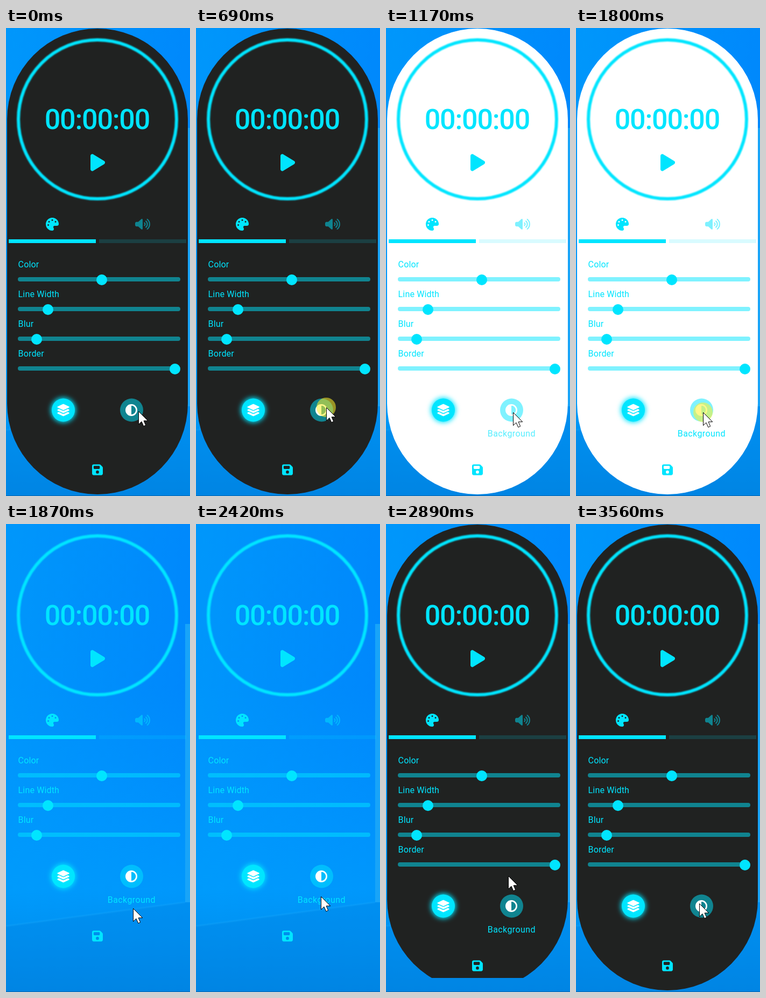
An HTML page for the animation above (3620 ms loop, 342 by 866 pixels).

```html
<!DOCTYPE html>
<html lang="en">
<head>
<meta charset="utf-8">
<title>Timer themes</title>
<style>
  html, body { margin: 0; width: 100%; height: 100%; overflow: hidden; background: #0091f6; }
  svg { display: block; width: 100vw; height: 100vh; color: #00e5ff; font: 16px Roboto, sans-serif; }
  #ui { fill: currentColor; }
  .half { opacity: .5; }
  .faint { opacity: .15; }
  .icon { fill: #fff; }
  .label { letter-spacing: .15px; }
  #tip { letter-spacing: .4px; text-anchor: middle; }
  #time { font-size: 52px; font-weight: 500; letter-spacing: -1.2px; text-anchor: middle; }
</style>
</head>
<body>
<svg viewBox="0 0 342 866">
  <defs>
    <linearGradient id="sky" x1="0" y1="0" x2="1" y2=".25">
      <stop offset="0" stop-color="#0097fb"/><stop offset="1" stop-color="#0088fc"/>
    </linearGradient>
    <linearGradient id="shade" x1="0" y1="0" x2="0" y2="1">
      <stop offset=".35" stop-color="#009cff" stop-opacity="0"/>
      <stop offset=".78" stop-color="#009dfc" stop-opacity=".75"/>
      <stop offset="1" stop-color="#0084e2"/>
    </linearGradient>
    <filter id="soft" x="-10%" y="-10%" width="120%" height="120%"><feGaussianBlur stdDeviation=".8"/></filter>
    <filter id="glow" x="-60%" y="-60%" width="220%" height="220%"><feGaussianBlur stdDeviation="5"/></filter>
    <path id="sheet" d="M477 210l53 24c18 9 18 35 0 44l-218 101c-15 7-33 7-48 0L46 278c-18-9-18-35 0-44l53-24 152 70c24 11 50 11 74 0z"/>
  </defs>

  <!-- desktop -->
  <rect width="342" height="866" fill="url(#sky)"/>
  <rect width="342" height="866" fill="url(#shade)"/>
  <path d="M0 744L342 699V866H0z" fill="#0084e4" opacity=".4"/>
  <path d="M0 744L333 700" stroke="#28b4ff" stroke-width="2" opacity=".35" filter="url(#soft)"/>
  <rect x="333" y="185" width="9" height="515" fill="#18a4f8"/>
  <rect y="865" width="342" height="1" fill="#0a66ae"/>

  <rect id="shell" x="2" y="1" width="336" height="862" rx="168"/>

  <g id="ui">
    <circle cx="170" cy="169" r="147" fill="none" stroke="currentColor" stroke-width="6" filter="url(#soft)"/>
    <text id="time" x="169.4" y="187">00:00:00</text>
    <path transform="translate(157 231) scale(.0703)" d="M73 39C40 19 0 42 0 80V432c0 38 40 61 73 41L361 297c31-19 31-63 0-82z"/>

    <path transform="translate(74 351) scale(.0469)" fill-rule="evenodd" d="M512 256c0 40-33 64-70 64H344c-27 0-48 21-48 48 0 26 24 50 24 82 0 32-22 62-64 62A256 256 0 1 1 512 256z
      M128 288a32 32 0 1 0-64 0 32 32 0 1 0 64 0z M128 192a32 32 0 1 0 0-64 32 32 0 1 0 0 64z
      M288 96a32 32 0 1 0-64 0 32 32 0 1 0 64 0z M384 192a32 32 0 1 0 0-64 32 32 0 1 0 0 64z"/>
    <g class="half" transform="translate(240 351.8) scale(.0437)">
      <path d="M301 35c12 5 19 16 19 29V448c0 28-33 42-53 24L132 352H64c-35 0-64-29-64-64V224c0-35 29-64 64-64h68L267 40c9-8 23-10 34-5z"/>
      <path d="M397 200a71 71 0 0 1 0 112M458 126a168 168 0 0 1 0 260M518 51a265 265 0 0 1 0 410"
        fill="none" stroke="currentColor" stroke-width="48" stroke-linecap="round"/>
    </g>
    <rect x="5" y="391" width="162" height="7"/>
    <rect class="faint" x="173" y="391" width="162" height="7"/>

    <g id="sliders"></g>

    <g id="lower">
      <circle cx="106.5" cy="707" r="23" filter="url(#glow)"/>
      <circle cx="106.5" cy="707" r="21.5"/>
      <g class="icon" transform="translate(94 695.8) scale(.0437)">
        <path d="M264 5c15-7 33-7 48 0l218 101c18 9 18 35 0 44l-218 101c-15 7-33 7-48 0L46 150c-18-9-18-35 0-44z"/>
        <use href="#sheet"/><use href="#sheet" y="128"/>
      </g>
      <circle class="half" cx="233.5" cy="707" r="21.5"/>
      <path class="icon" fill-rule="evenodd" d="M222 707a11 11 0 1 1 22 0 11 11 0 1 1-22 0zM233 698.7v16.6a8.3 8.3 0 0 0 0-16.6z"/>
      <text id="tip" x="233.4" y="756">Background</text>
      <path transform="translate(160 806) scale(.0446)" fill-rule="evenodd" d="M64 32C29 32 0 61 0 96V416c0 35 29 64 64 64H384c35 0 64-29 64-64V173c0-17-7-33-19-45L352 51C340 39 324 32 307 32z
        M64 128c0-18 14-32 32-32H288c18 0 32 14 32 32v64c0 18-14 32-32 32H96c-18 0-32-14-32-32z M224 288a64 64 0 1 1 0 128 64 64 0 1 1 0-128z"/>
    </g>
  </g>

  <g id="pointer">
    <circle id="press" r="18" fill="#fff028" opacity=".55"/>
    <path d="M.5 .5V24.5L6 19.3L9.8 27.8L13.7 26L10.1 17.8H17.8z" fill="#fff" stroke="#000"/>
  </g>
</svg>
<script>
const LOOP = 3620;
const $ = id => document.getElementById(id);

// Each table row: start time, then the value held from then on.
const themes = [[0, 'dark'], [760, 'light'], [1870, 'clear'], [2890, 'dark']];
const presses = [[0, false], [690, true], [760, false], [1800, true], [1870, false], [2830, true], [2890, false]];
const pointer = [
  [0, 246, 709], [70, 242, 702],
  [900, 241, 703], [970, 240, 705], [1035, 238, 708], [1105, 237, 710], [1170, 236, 711],
  [2350, 235, 704], [2415, 232, 689], [2480, 229, 674],
  [2620, 228, 659], [2690, 227, 651],
  [3490, 228, 678], [3560, 229, 702]
];
const fills = { dark: '#202221', light: '#fff', clear: 'none' };

const held = (table, t) => table.findLast(row => row[0] <= t);
const clamp = v => Math.max(0, Math.min(1, v));
const stepped = (t, start, gap) => clamp(Math.floor((t - start) / gap + 1) / 6);

const sliders = [['Color', 178], ['Line Width', 78], ['Blur', 57], ['Border', 314]];
$('sliders').innerHTML = sliders.map(([name, x], i) => `
  <g id="${name === 'Border' ? 'border' : 'slider' + i}" transform="translate(0 ${i * 55})">
    <text class="label" x="22.6" y="443">${name}</text>
    <rect class="half" x="22" y="461" width="302" height="8" rx="4"/>
    <circle cx="${x}" cy="466" r="10"/>
  </g>`).join('');

function draw(t) {
  const theme = held(themes, t)[1];
  const clear = theme === 'clear';
  $('shell').setAttribute('fill', fills[theme]);
  // The window is still growing back just after the clear theme ends.
  $('shell').style.clipPath = t >= 2890 && t < 2970 ? 'inset(0 0 23px 0)' : 'none';
  $('border').style.display = clear ? 'none' : '';
  $('lower').setAttribute('transform', `translate(0 ${clear ? -55 : 0})`);
  $('tip').style.opacity = stepped(t, 900, 68) - stepped(t, 2970, 66);

  const [, x, y] = held(pointer, t);
  $('pointer').setAttribute('transform', `translate(${x} ${y})`);
  $('press').style.display = held(presses, t)[1] ? '' : 'none';
}

const begin = performance.now();
function tick() {
  draw((performance.now() - begin) % LOOP);
  requestAnimationFrame(tick);
}
tick();
</script>
</body>
</html>
```
